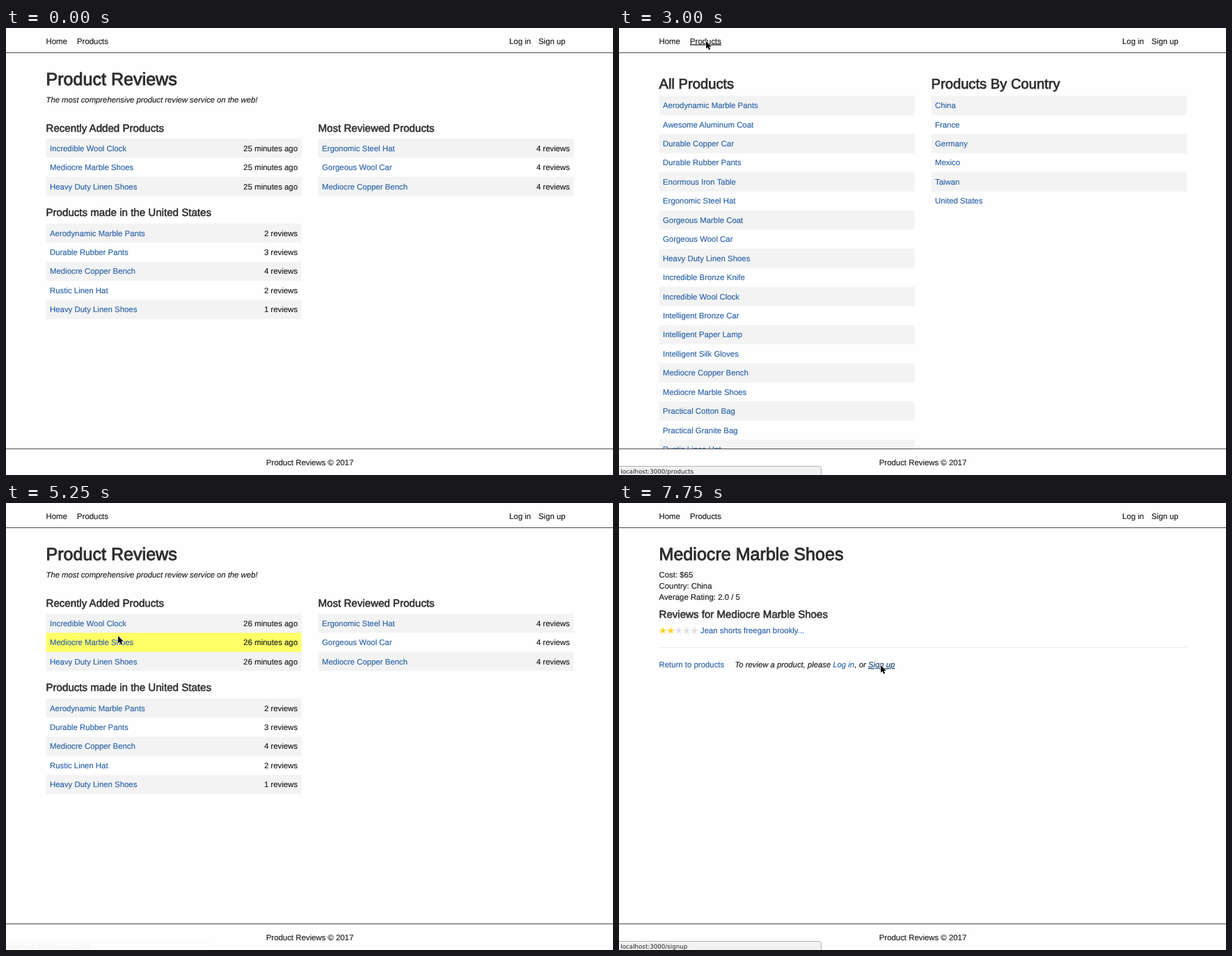
These frames come from a looping animation (872 px wide and 642 px high, 8000 ms). An HTML page:

```html
<!DOCTYPE html>
<html lang="en">
<head>
<meta charset="utf-8">
<title>Product Reviews</title>
<style>
  html, body { margin: 0; width: 100%; height: 100%; overflow: hidden; background: #fefefe; }
  svg { display: block; width: 872px; height: 642px; }
  text {
    --ink: #1c1c1c;
    font: 11.4px "Liberation Sans", Arial, sans-serif;
    fill: var(--ink); stroke: var(--ink); stroke-width: .15px;
    text-rendering: geometricPrecision; white-space: pre;
  }
  .h1, .h3, .h4 { --ink: #2d2d2d; }
  .h1 { font-size: 25.1px; stroke-width: .9px; }
  .h3 { font-size: 20.2px; stroke-width: .75px; }
  .h4 { font-size: 15.1px; stroke-width: .55px; }
  .link { --ink: #2a62a8; }
  .hover { text-decoration: underline; }
  .link.hover { --ink: #1d4170; }
  .italic { font-size: 11.3px; font-style: italic; }
  .end { text-anchor: end; }
  .middle { text-anchor: middle; }
  .status { font: 8.7px "DejaVu Sans", sans-serif; stroke: none; }
</style>
</head>
<body>
<svg viewBox="0 0 872 642">
  <defs><clipPath id="content"><rect y="36" width="872" height="568"/></clipPath></defs>
  <g id="page" clip-path="url(#content)"></g>
  <g id="chrome"></g>
  <g id="status">
    <path d="M-1 629.5H287.5Q290.5 629.5 290.5 632.5V643H-1Z" fill="#f1f1f1" stroke="#b3b3b3"/>
    <text id="address" class="status" x="2.3" y="639.6"></text>
  </g>
  <g id="cursor">
    <path d="M1 1V11.8L3.5 9.5L5.2 13.4L7.1 12.6L5.4 8.7H8.8Z" fill="#000" stroke="#fff" stroke-width="1.4" paint-order="stroke" stroke-linejoin="round"/>
  </g>
</svg>
<script>
const LOOP = 8000, LEFT = 57.5, RIGHT = 448.5, ROW = 27.43, TABLE_WIDTH = 367;
const HOST = 'localhost:3000';
const $ = id => document.getElementById(id);

// Each step overrides part of the state and holds until the next one.
const steps = [
  { t: 0, page: 'home', minutes: 25, cursor: null, hover: '', row: -1, path: '', bar: 0 },
  { t: 750, cursor: [478, 4] },
  { t: 1000, cursor: [432, 48] },
  { t: 1750, cursor: [104, 11] },
  { t: 2000, cursor: [112, 13] },
  { t: 2250, cursor: [118, 17] },
  { t: 2500, cursor: [121, 17], hover: 'Products', path: '/products', bar: .5 },
  { t: 2750, cursor: [124, 18], bar: 1 },
  { t: 3000, page: 'products' },
  { t: 3750, cursor: [113, 20] },
  { t: 4000, cursor: [64, 22], hover: 'Home', path: '' },
  { t: 4500, page: 'home', minutes: 26 },
  { t: 4750, cursor: [140, 168], hover: 'Incredible Wool Clock', row: 0, path: '/products/20' },
  { t: 5000, cursor: [157, 194], hover: '', row: 1 },
  { t: 5250, cursor: [160, 190], bar: .07 },
  { t: 5500, cursor: [152, 200], hover: 'Mediocre Marble Shoes', path: '/products/19', bar: .6 },
  { t: 5750, bar: 1 },
  { t: 6000, page: 'detail', hover: '', row: -1 },
  { t: 6750, cursor: [287, 222] },
  { t: 7000, cursor: [320, 234], hover: 'login', path: '/signin' },
  { t: 7250, cursor: [323, 235] },
  { t: 7500, cursor: [345, 228], hover: '' },
  { t: 7750, cursor: [375, 232], hover: 'signup', path: '/signup' }
];

const recent = ['Incredible Wool Clock', 'Mediocre Marble Shoes', 'Heavy Duty Linen Shoes'];
const popular = ['Ergonomic Steel Hat', 'Gorgeous Wool Car', 'Mediocre Copper Bench'];
const domestic = [['Aerodynamic Marble Pants', 2], ['Durable Rubber Pants', 3],
  ['Mediocre Copper Bench', 4], ['Rustic Linen Hat', 2], ['Heavy Duty Linen Shoes', 1]];
const products = ['Aerodynamic Marble Pants', 'Awesome Aluminum Coat', 'Durable Copper Car',
  'Durable Rubber Pants', 'Enormous Iron Table', 'Ergonomic Steel Hat', 'Gorgeous Marble Coat',
  'Gorgeous Wool Car', 'Heavy Duty Linen Shoes', 'Incredible Bronze Knife', 'Incredible Wool Clock',
  'Intelligent Bronze Car', 'Intelligent Paper Lamp', 'Intelligent Silk Gloves',
  'Mediocre Copper Bench', 'Mediocre Marble Shoes', 'Practical Cotton Bag',
  'Practical Granite Bag', 'Rustic Linen Hat'];
const countries = ['China', 'France', 'Germany', 'Mexico', 'Taiwan', 'United States'];

const text = (x, y, content, style = '') => `<text x="${x}" y="${y}" class="${style}">${content}</text>`;
const rect = (x, y, w, h, fill) => `<rect x="${x}" y="${y}" width="${w}" height="${h}" fill="${fill}"/>`;
const link = (x, y, content, active, style = '') =>
  text(x, y, content, `link ${style} ${active ? 'hover' : ''}`);

function table(x, top, rows, activeRow = -1, hover = '') {
  return rows.map(([name, note = ''], i) => {
    const y = top + i * ROW;
    const fill = i === activeRow ? '#ffff66' : i % 2 ? 'none' : '#f3f3f3';
    return rect(x, y, TABLE_WIDTH, ROW, fill) +
      link(x + 5.5, y + 17.7, name, i === activeRow && name === hover) +
      text(x + 361.5, y + 17.7, note, 'end');
  }).join('');
}

function star(cx, cy, fill) {
  const points = Array.from({ length: 10 }, (_, i) => {
    const radius = i % 2 ? 2.1 : 5.5, angle = i * Math.PI / 5;
    return `${cx + radius * Math.sin(angle)},${cy - radius * Math.cos(angle)}`;
  });
  return `<polygon points="${points.join(' ')}" fill="${fill}"/>`;
}

const pages = {
  home: s =>
    text(LEFT, 82, 'Product Reviews', 'h1') +
    text(LEFT, 107, 'The most comprehensive product review service on the web!', 'italic') +
    text(LEFT, 148.5, 'Recently Added Products', 'h4') +
    table(LEFT, 159, recent.map(name => [name, `${s.minutes} minutes ago`]), s.row, s.hover) +
    text(RIGHT, 148.5, 'Most Reviewed Products', 'h4') +
    table(RIGHT, 159, popular.map(name => [name, '4 reviews'])) +
    text(LEFT, 270.3, 'Products made in the United States', 'h4') +
    table(LEFT, 280.8, domestic.map(([name, count]) => [name, `${count} reviews`])),

  products: () =>
    text(LEFT, 86.5, 'All Products', 'h3') +
    table(LEFT, 97.5, products.map(name => [name])) +
    text(RIGHT, 86.5, 'Products By Country', 'h3') +
    table(RIGHT, 97.5, countries.map(name => [name])),

  detail: s =>
    text(LEFT, 82, 'Mediocre Marble Shoes', 'h1') +
    ['Cost: $65', 'Country: China', 'Average Rating: 2.0 / 5']
      .map((line, i) => text(LEFT, 107 + i * 16, line)).join('') +
    text(LEFT, 164.6, 'Reviews for Mediocre Marble Shoes', 'h4') +
    [0, 1, 2, 3, 4].map(i => star(63 + i * 11.35, 183.5, i < 2 ? '#ffd21c' : '#dedede')).join('') +
    link(117, 187, 'Jean shorts freegan brookly...') +
    rect(LEFT, 207, 758, 1, '#ececec') +
    link(LEFT, 236.2, 'Return to products') +
    text(166.5, 236.2, 'To review a product, please', 'italic') +
    link(307.3, 236.2, 'Log in', s.hover === 'login', 'italic') +
    text(338.5, 236.2, ', or', 'italic') +
    link(358, 236.2, 'Sign up', s.hover === 'signup', 'italic')
};

const frame = s =>
  [[57.5, 'Home'], [102, 'Products'], [723, 'Log in'], [765, 'Sign up']]
    .map(([x, label]) => text(x, 22.6, label, label === s.hover ? 'hover' : '')).join('') +
  rect(0, 35, 872, 1, '#4a4a4a') +
  rect(0, 604, 872, 1, '#4a4a4a') +
  text(436.5, 628.2, 'Product Reviews © 2017', 'middle');

function draw(s) {
  $('page').innerHTML = pages[s.page](s);
  $('chrome').innerHTML = frame(s);
  $('status').setAttribute('opacity', s.bar);
  $('address').textContent = HOST + s.path;
  $('cursor').setAttribute('visibility', s.cursor ? 'visible' : 'hidden');
  if (s.cursor) $('cursor').setAttribute('transform', `translate(${s.cursor})`);
}

const start = performance.now();
let shown = -1;
function tick(now) {
  const time = Math.max(0, now - start) % LOOP;
  const count = steps.filter(step => step.t <= time).length;
  if (count !== shown) {
    shown = count;
    draw(Object.assign({}, ...steps.slice(0, count)));
  }
  requestAnimationFrame(tick);
}
tick(start);
</script>
</body>
</html>
```
